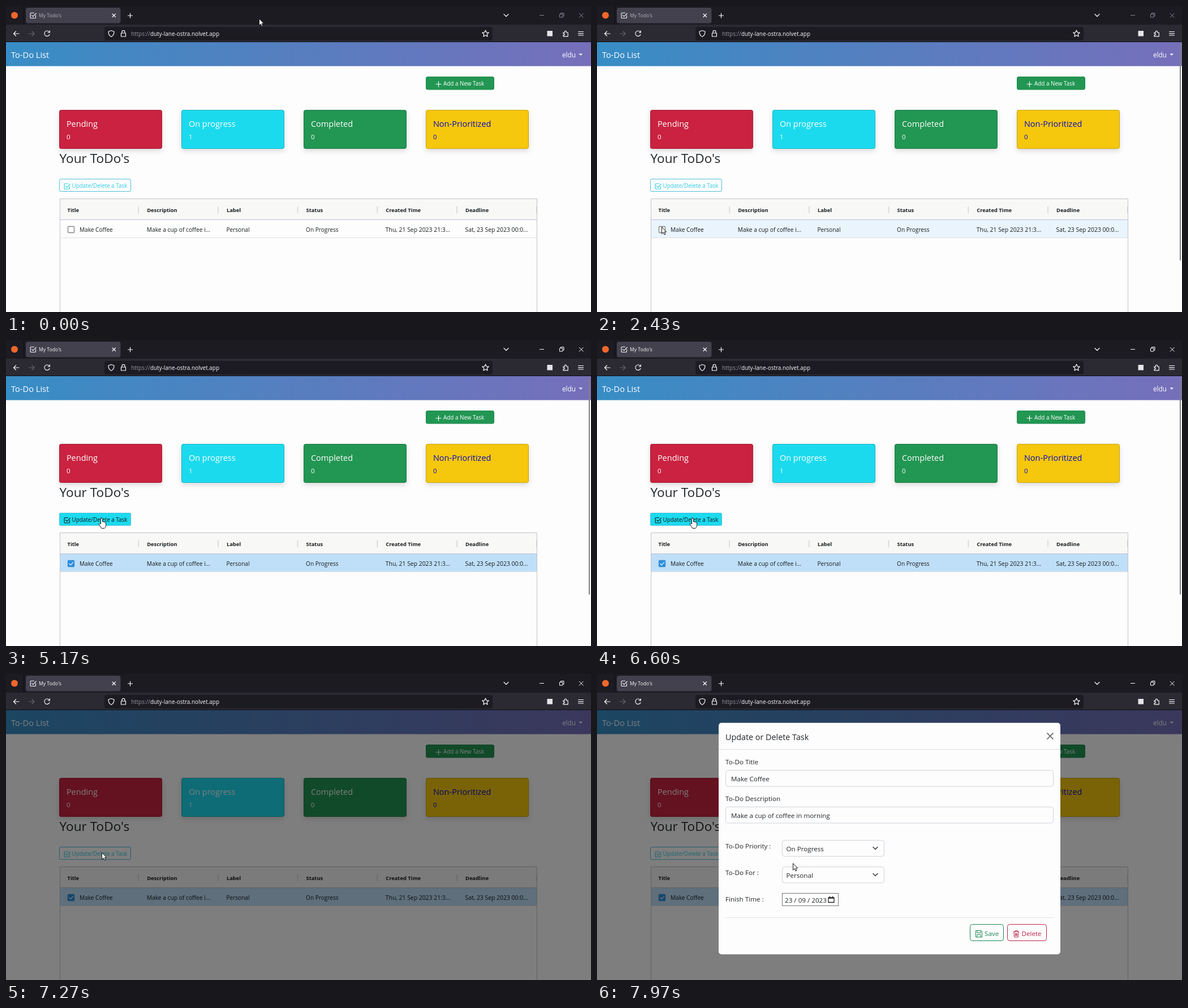
Recreate the animation shown at these times as an HTML page. Size 1034 by 542 pixels, loop 8000 ms.

```html
<!DOCTYPE html>
<html lang="en">
<head>
<meta charset="utf-8">
<title>To-Do List</title>
<style>
  html, body { margin: 0; width: 100%; height: 100%; overflow: hidden; background: #fdfdfd; }
  svg { display: block; width: 1034px; height: 542px; font-family: "Open Sans", "Noto Sans", sans-serif; }
  text { white-space: pre; }
  .line { fill: none; stroke: #fbfbfe; stroke-width: 1.2; stroke-linecap: round; stroke-linejoin: round; }
  .card-title { font-size: 14.5px; }
  .card-count { font-size: 11.5px; }
  .small { font-size: 9.9px; }
  .head { font-size: 9.3px; font-weight: 700; fill: #181d1f; }
  .cell { font-size: 10.1px; fill: #181d1f; }
  .form { font-size: 11.65px; fill: #212529; }
  .field { fill: #fdfdfd; stroke: #ced4da; }
</style>
</head>
<body>
<svg viewBox="0 0 1034 542">
  <defs>
    <linearGradient id="navFill"><stop stop-color="#378dc5"/><stop offset="1" stop-color="#766fba"/></linearGradient>
    <filter id="shadow" x="-10%" y="-20%" width="120%" height="150%">
      <feDropShadow dx="0" dy="4" stdDeviation="4" flood-opacity=".13"/>
    </filter>
    <g id="checkSquare" fill="none" stroke-width="1.1" stroke-linecap="round" stroke-linejoin="round">
      <path d="M7 .7H1.8Q.6.7.6 2v6.7Q.6 10 1.8 10h6.9Q10 10 10 8.7V5.3M3 4.8l2.3 2.3L10.8 1.5"/>
    </g>
    <path id="chevron" d="M-4-2L0 2L4-2"/>
  </defs>

  <!-- Page -->
  <rect width="1034" height="542" fill="#fdfdfd"/>
  <rect y="64" width="1034" height="42.5" fill="url(#navFill)"/>
  <g fill="#fff">
    <text x="9" y="92" font-size="14.6">To-Do List</text>
    <text x="983" y="91" font-size="11.8">eldu</text>
    <path d="M1012.5 84.5h6.6l-3.3 3.3z"/>
  </g>
  <rect x="742.5" y="125.5" width="120" height="22.5" rx="2.5" fill="#229653" stroke="#1c8a4b"/>
  <path class="line" d="M760 138.5h9M764.5 134v9" stroke-width="1"/>
  <text class="small" x="773" y="141" fill="#fff">Add a New Task</text>
  <rect id="cardLift" x="95" y="184" width="182" height="69" rx="4" filter="url(#shadow)"/>
  <g id="cards"></g>
  <text x="94.5" y="278" font-size="22.6" fill="#212529">Your ToDo's</text>

  <rect id="buttonFill" x="94" y="306" width="127" height="23" rx="3" fill="#1bdaee"/>
  <rect x="94.5" y="306.5" width="126" height="22" rx="2.5" fill="none" stroke="#4fbfdc"/>
  <g id="buttonLabel">
    <use href="#checkSquare" x="102.5" y="314" stroke="currentColor"/>
    <text class="small" x="116.5" y="322" fill="currentColor">Update/Delete a Task</text>
  </g>

  <rect x="95" y="342" width="844" height="36" fill="#f8f8f7"/>
  <rect id="row" x="96" y="379" width="843" height="31.5"/>
  <path d="M95.5 542V341.5H938.5V542" fill="none" stroke="#bfc3c8"/>
  <path d="M95 378.5H939" stroke="#c2c2d6"/>
  <path d="M95 410.5H939" stroke="#dde0e3"/>
  <rect id="cellFocus" x="95.5" y="379.5" width="139" height="30.5" fill="none" stroke="#5598cc"/>
  <g id="columns"></g>
  <rect x="109.5" y="390.5" width="11" height="11" rx="1.5" fill="#fff" stroke="#858585" stroke-width="1.4"/>
  <rect id="tickGlow" x="107.5" y="388.5" width="15" height="15" rx="3" fill="#77b9ee"/>
  <g id="tick">
    <rect x="109" y="390" width="12" height="12" rx="1.5" fill="#2b8fe0"/>
    <path class="line" d="M111.7 396.2l2.3 2.4l4.6-4.8" stroke-width="1.6"/>
  </g>
  <rect id="scrollbar" x="1030" y="67" width="2" height="384" rx="1" fill="#7f7f83"/>
  <g id="status">
    <rect y="529.5" width="183" height="13" fill="#2b2a33"/>
    <text x="3" y="541" font-size="8.85" fill="#fbfbfe">https://duty-lane-ostra.nolvet.app/pending</text>
  </g>

  <rect id="backdrop" y="64" width="1034" height="478"/>

  <!-- Dialog -->
  <g id="dialog">
    <rect x="215" y="86.5" width="604" height="410" rx="5" fill="#fdfdfd"/>
    <text x="227" y="116.5" font-size="14.35" fill="#212529">Update or Delete Task</text>
    <path d="M796 105l10 10m0-10l-10 10" stroke="#74777a" stroke-width="1.8" stroke-linecap="round"/>
    <path d="M215 133.5H819M227 431.5H807" stroke="#dee2e6"/>
    <g id="fields"></g>
    <rect x="327.5" y="388.5" width="99" height="22" fill="#fff" stroke="#767676"/>
    <text class="form" x="332" y="405">23 / 09 / 2023</text>
    <path d="M409 396h10v8.5h-10zM409 397h10M411.5 393.5v2M416.5 393.5v2" fill="none" stroke="#222" stroke-width="1.3"/>
    <g fill="none" stroke="#198754">
      <rect x="659.5" y="443.5" width="59" height="29" rx="4"/>
      <path d="M669.5 454.5h9.5l1.5 1.5v10h-11zM672 454.5v4h6v-4M672 466v-4.5h6v4.5"/>
      <text class="form" x="685" y="463.5" style="fill:#198754" stroke="none">Save</text>
    </g>
    <g fill="none" stroke="#bd2148">
      <rect x="725.5" y="443.5" width="69" height="29" rx="4"/>
      <path d="M736 456.5h10M739 456v-1.5h4v1.5M737 457l.6 9h6.8l.6-9M739.5 459v5M741 459v5M742.5 459v5"/>
      <text class="form" x="750.5" y="463.5" style="fill:#bd2148" stroke="none">Delete</text>
    </g>
  </g>

  <!-- Browser window -->
  <rect width="1034" height="33.5" fill="#1c1b22"/>
  <rect y="33" width="1034" height="31" fill="#2b2a33"/>
  <path d="M0 63.5H1034M31.5 0V33" stroke="#0e0d13"/>
  <circle cx="15" cy="16.5" r="6" fill="#f2662b"/>
  <rect x="35" y="3" width="167.5" height="27.5" rx="4" fill="#42414d"/>
  <use href="#checkSquare" x="42.5" y="11.5" stroke="#fbfbfe"/>
  <text id="tabTitle" x="58" y="20.3" font-size="8.65">My Todo's</text>
  <rect x="174" y="37" width="686" height="24" rx="4" fill="#1c1b22"/>
  <text x="221" y="53" font-size="9.95" fill="#fbfbfe"><tspan fill="#9695a0">https://</tspan>duty-lane-ostra.nolvet.app</text>
  <g class="line">
    <path d="M188 14l5.5 5.5m0-5.5l-5.5 5.5M215.5 17h8M219.5 13v8"/>
    <use href="#chevron" x="884" y="16.5"/>
    <path d="M23 49H13.5m4-4l-4 4l4 4"/>
    <path d="M40.5 49H50m-4-4l4 4l-4 4" stroke="#65646e"/>
    <path d="M76.5 46A4.7 4.7 0 1 0 77 50.5M77.3 43.8v3.2h-3.2"/>
    <path d="M186 43.5l5 1.8q.3 6.5-5 9.2q-5.3-2.7-5-9.2z"/>
    <path d="M203.5 48h8v6h-8zM205 48v-2.2a2.5 2.5 0 0 1 5 0V48"/>
    <path d="M847.5 43l1.7 3.8l4 .4l-3 2.7l.9 4.1l-3.6-2.1l-3.6 2.1l.9-4.1l-3-2.7l4-.4z"/>
    <path d="M985 47h2.5v-1.5a1.5 1.5 0 0 1 3 0V47h2.7v6.8H985v-2.2h1a1.4 1.4 0 0 0 0-2.8h-1z"/>
    <path d="M1011.5 45.5h9M1011.5 48.8h9M1011.5 52h9"/>
  </g>
  <rect x="956.5" y="44" width="9.5" height="9.5" fill="#e4e4e9"/>
  <path id="windowButtons" d="M943 16.5h8M978.5 14.5h5.5v5.5h-5.5zM980.5 14.3v-1.8h5.5V18h-1.8M1013 13l7.5 7.5m0-7.5l-7.5 7.5" fill="none"/>

  <g id="cursor" stroke="#16161a" stroke-width="1" stroke-linejoin="round" fill="#fff">
    <path id="arrow" d="M.5.5V12.3L3.2 9.8L5 14L7 13.1L5.2 9H8.6Z"/>
    <path id="hand" d="M-1.5 10V1.2Q-1.4-.4 0-.4T1.5 1.2V6Q3 5 4 6.3Q5.6 5.8 6 7.2Q7.8 7 7.6 9V12.5Q7.3 16 5 17.5H-.2Q-1.5 15.2-4.2 11.5Q-5.4 9.3-3.7 9Q-2.5 9-1.5 10Z"/>
  </g>
</svg>
<script>
const $ = id => document.getElementById(id);

$("cards").innerHTML = [
  ["Pending", 0, "#ca2041", "#fff"],
  ["On progress", 1, "#1bdaee", "#fff"],
  ["Completed", 0, "#229653", "#fff"],
  ["Non-Prioritized", 0, "#f5c711", "#0909c4"],
].map(([title, count, fill, ink], i) => `
  <g transform="translate(${Math.round(94.4 + i * 215.8)} 184)">
    <rect width="182" height="69" rx="4" fill="${fill}" filter="url(#shadow)"/>
    <rect x=".5" y=".5" width="181" height="68" rx="3.5" fill="none" stroke="#000" stroke-opacity=".17"/>
    <text class="card-title" x="12.9" y="29.5" fill="${ink}">${title}</text>
    <text class="card-count" x="12.9" y="52" fill="${ink}">${count}</text>
  </g>`).join("");

$("columns").innerHTML = [
  ["Title", "Make Coffee", 10.1],
  ["Description", "Make a cup of coffee i...", 10.25],
  ["Label", "Personal", 10.1],
  ["Status", "On Progress", 10.1],
  ["Created Time", "Thu, 21 Sep 2023 21:3...", 10.4],
  ["Deadline", "Sat, 23 Sep 2023 00:0...", 10.4],
].map(([head, cell, size], i) => {
  const x = 108 + i * 140.7;
  return `<text class="head" x="${x + 0.5}" y="365">${head}</text>
    <text class="cell" x="${i ? x : 130}" y="399.7" style="font-size:${size}px">${cell}</text>
    <path d="M${x + 126.2} 355v12" stroke="#cfd2d6" stroke-width="1.4"/>`;
}).join("");

const label = (text, y) => `<text class="form" x="227" y="${y}">${text}</text>`;
const input = (title, value, y) => label(title, y - 10.5) + `
  <rect class="field" x="227.5" y="${y}" width="579" height="28.5" rx="4"/>
  <text class="form" x="237" y="${y + 19.5}">${value}</text>`;
const select = (title, value, y) => label(title, y + 14.5) + `
  <rect class="field" x="327.5" y="${y}" width="180" height="28.5" rx="4"/>
  <text class="form" x="334.5" y="${y + 19.5}">${value}</text>
  <use href="#chevron" x="492" y="${y + 14}" fill="none" stroke="#343a40" stroke-width="1.5" stroke-linecap="round"/>`;
$("fields").innerHTML =
  input("To-Do Title", "Make Coffee", 170.5) +
  input("To-Do Description", "Make a cup of coffee in morning", 235.5) +
  select("To-Do Priority :", "On Progress", 294.5) +
  select("To-Do For :", "Personal", 341.5) +
  label("Finish Time :", 403);

const LOOP = 8000, SELECT = 2950, BLUR = 4900, HOVER = 4600, OPEN = 7116, DIALOG = 7290;

// Pointer stops: time, x, y
const stops = [
  [0, 447, 22], [250, 447, 22], [1000, 200, 215], [1400, 141, 357], [2000, 114, 391],
  [3370, 114, 391], [3730, 126, 370], [4650, 165, 318], [5100, 169, 316],
  [7300, 169, 316], [7970, 346, 335], [LOOP, 346, 335],
];

const ramp = (t, start, length) => Math.min(1, Math.max(0, (t - start) / length));
const show = (id, visible) => $(id).setAttribute("visibility", visible ? "visible" : "hidden");
const fade = (id, amount) => $(id).setAttribute("opacity", amount);
const paint = (id, name, color) => $(id).setAttribute(name, color);

function pointerAt(t) {
  const i = stops.findIndex(stop => stop[0] > t);
  const [t0, x0, y0] = stops[i - 1], [t1, x1, y1] = stops[i];
  const k = ramp(t, t0, t1 - t0), e = k * k * (3 - 2 * k);
  return [x0 + (x1 - x0) * e, y0 + (y1 - y0) * e];
}

function render(t) {
  const [x, y] = pointerAt(t);
  const selected = t >= SELECT, focused = selected && t < BLUR;
  const onCard = t < SELECT && x > 94 && x < 276 && y > 184 && y < 253;
  const onRow = y > 379 && y < 411 && x < 939;
  const hand = onCard || (t >= HOVER && t < OPEN);

  $("cursor").setAttribute("transform", `translate(${x} ${y})`);
  show("arrow", !hand);
  show("hand", hand);

  paint("row", "fill", selected ? "#bfdff8" : onRow ? "#e9f4fd" : "#fdfdfd");
  show("tick", selected);
  show("tickGlow", focused);
  show("cellFocus", focused);
  paint("tabTitle", "fill", selected ? "#fbfbfe" : "#b4b3bc");
  paint("windowButtons", "stroke", selected ? "#fbfbfe" : "#85848c");
  fade("cardLift", ramp(t, 900, 300) - ramp(t, 1250, 300));

  const hover = ramp(t, HOVER, 150) - ramp(t, OPEN, 150);
  fade("buttonFill", hover);
  $("buttonLabel").style.color = `color-mix(in srgb, #10191c ${hover * 100}%, #2fcbe4)`;

  show("scrollbar", t > 500 && t < OPEN);
  show("status", t > 1000 && t < 1750);

  fade("backdrop", ramp(t, OPEN, 150) / 2);
  fade("dialog", ramp(t, DIALOG, 150));
  const rise = (1 - ramp(t, DIALOG, 300)) ** 2;
  $("dialog").setAttribute("transform", `translate(0 ${-37 * rise})`);
}

function tick() {
  render(performance.now() % LOOP);
  requestAnimationFrame(tick);
}
tick();
</script>
</body>
</html>
```
